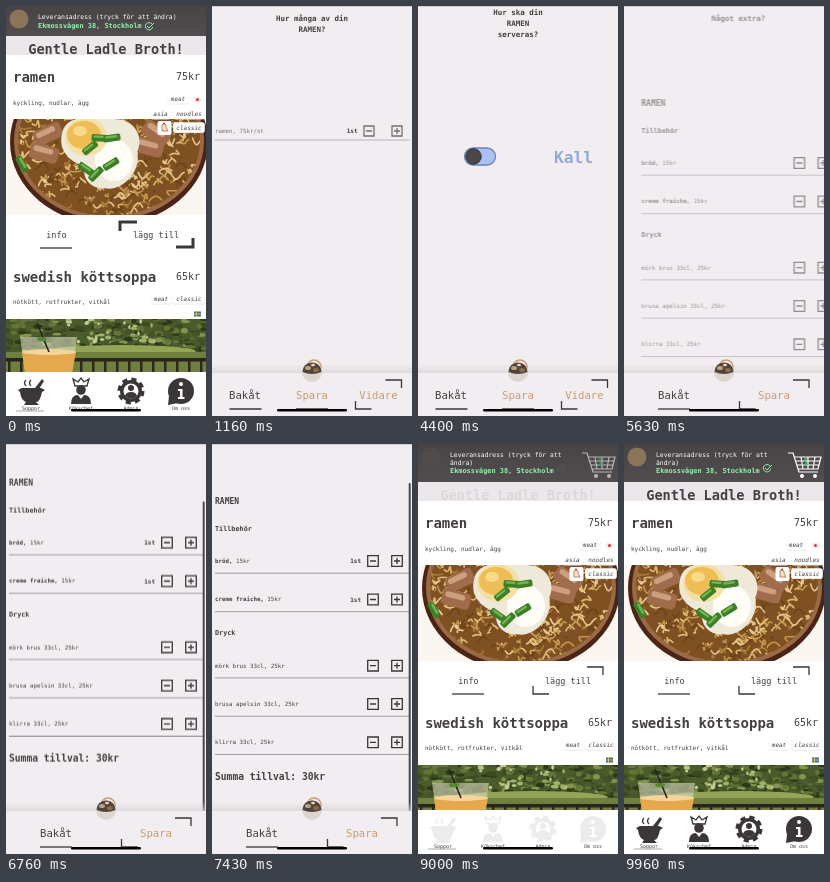
An HTML page for the animation above (10000 ms loop, 200 by 410 pixels).

```html
<!DOCTYPE html>
<html lang="sv">
<head>
<meta charset="utf-8">
<title>Soup order</title>
<style>
html, body { margin: 0; width: 100%; height: 100%; overflow: hidden; background: #f1edf0; }
svg { display: block; width: 100vw; height: 100vh; }
text { font-family: "DejaVu Sans Mono", monospace; fill: #443f42; white-space: pre; }
.b { font-weight: bold; }
.i { font-style: oblique; }
.mid { text-anchor: middle; }
.end { text-anchor: end; }
.light { fill: #fff; }
.mint { fill: #91f2ab; }
.green { fill: #3fcb62; }
.gold { fill: #c99d6b; }
.cold { fill: #93a9d9; }
.warm { fill: #d98d78; }
.line { fill: none; stroke: #3b3638; stroke-width: 1.3; }
.rule { stroke: #989297; stroke-width: .9; }
</style>
</head>
<body>
<svg id="stage" viewBox="0 0 200 410" xmlns="http://www.w3.org/2000/svg"></svg>
<script>
const LOOP = 10000;
let css = '', count = 0;

// Each stop is [milliseconds, declarations].
function anim(...stops) {
  const name = 'k' + count++;
  css += `@keyframes ${name}{${stops.map(([ms, d]) => `${ms / LOOP * 100}%{${d}}`).join('')}}`;
  return `style="animation:${name} ${LOOP}ms linear infinite"`;
}
const fade = (...stops) => anim(...stops.map(([ms, o]) => [ms, `opacity:${o}`]));
const group = (motion, ...parts) => `<g ${motion}>${parts.join('')}</g>`;

// Visible only between two times, with hard edges.
function hold(from, to, ...parts) {
  const stops = from ? [[0, 0], [from - 1, 0], [from, 1]] : [[0, 1]];
  stops.push(...(to < LOOP ? [[to - 1, 1], [to, 0], [LOOP, 0]] : [[LOOP, 1]]));
  return group(fade(...stops), ...parts);
}
// Flies in from the right and fades away.
function page([in0, in1, out0, out1], ...parts) {
  const away = 'opacity:0;transform:translateX(30px)';
  const home = 'opacity:1;transform:none';
  return group(anim([0, away], [in0, away + ';animation-timing-function:ease-out'], [in1, home], [out0, home],
    [out1, away], [LOOP, away]), ...parts);
}

const text = (x, cy, size, str, cls = '') =>
  `<text x="${x}" y="${cy + size * .34}" font-size="${size}" class="${cls}">${str}</text>`;
const rect = (x, y, w, h, fill, r = 0) =>
  `<rect x="${x}" y="${y}" width="${w}" height="${h}" rx="${r}" fill="${fill}"/>`;
const oval = (x, y, rx, ry, fill) => `<ellipse cx="${x}" cy="${y}" rx="${rx}" ry="${ry}" fill="${fill}"/>`;
const dot = (x, y, r, fill) => oval(x, y, r, r, fill);
const path = (d, extra = 'class="line"') => `<path d="${d}" ${extra}/>`;
const rule = (y, x1 = 3, x2 = 198) => path(`M${x1} ${y}H${x2}`, 'class="rule"');
const range = n => [...Array(n).keys()];

let seed = 7;
const rand = (lo, hi) => {
  seed = seed * 16807 % 2147483647;
  return lo + (hi - lo) * seed / 2147483647;
};
const pick = list => list[Math.floor(rand(0, list.length))];

const corners = (x1, y1, x2, y2) =>
  path(`M${x2 - 16} ${y1}H${x2}V${y1 + 8}M${x1} ${y2 - 8}V${y2}H${x1 + 16}`);
const pressedCorners = (x1, y1, x2, y2) =>
  path(`M${x1} ${y1 + 9}V${y1}H${x1 + 17}M${x2} ${y2 - 9}V${y2}H${x2 - 17}`, 'class="line" style="stroke-width:3"');

const button = (x, y, size, plus) =>
  path(`M${x - size} ${y - size}h${2 * size}v${2 * size}h${-2 * size}zM${x - 3} ${y}h6${plus ? `M${x} ${y - 3}v6` : ''}`);

function row(y, label, line, minus = 157, size = 5) {
  return text(3, y, 5.8, label) + button(minus, y, size) + button(185, y, size, true) + rule(y + line);
}

function ramenPhoto() {
  const noodles = range(300).map(() => {
    const x = rand(8, 194), y = rand(110, 212), w = rand(-10, 10), h = rand(-6, 6);
    const tone = pick(['#c4984f', '#ddb973', '#a97836', '#6d4318', '#e5c78c']);
    return path(`M${x} ${y}q${w / 2} ${h * 2} ${w} ${h}t${h} ${-w / 2}`, `fill="none" stroke="${tone}" stroke-width="1.6"`);
  }).join('');
  const slab = (w, h, dark, pale) => ([x, y, a]) => `<g transform="translate(${x} ${y}) rotate(${a})">` +
    rect(-w / 2, -h / 2, w, h, dark, h / 4) + rect(-w * .4, -h * .35, w * .7, h * .35, pale, h / 6) + '</g>';
  const leaf = slab(17, 7, '#3c7f28', '#74b350');
  const meat = slab(29, 16, '#a06c4c', '#cb9f80');
  return `<g clip-path="url(#photo)">${rect(0, 113, 200, 96, '#fbf6f0')}
    ${oval(103, 136, 99, 83, '#4a2415')}${oval(103, 135, 95, 79, '#9a6a45')}${oval(103, 135, 91, 75, '#7f5022')}
    <g clip-path="url(#bowl)">${noodles}</g>
    ${[[42, 128, -25], [38, 147, 15], [150, 127, 35], [143, 141, 15]].map(meat).join('')}
    ${path('M56 128C59 107 91 110 108 113C130 113 138 132 131 146C136 165 116 187 98 182C84 184 74 169 80 160C63 157 52 143 56 128Z', 'fill="#efe9da"')}
    ${oval(108, 154, 19, 21, '#fffdf6')}${oval(80, 131, 21, 19, '#f5dfa4')}${oval(78, 129, 17, 14, '#eebd55')}${oval(74, 125, 7, 5, '#f8da88')}
    ${[[94, 132, 4], [106, 132, -8], [84, 142, -38], [105, 158, -32], [80, 163, 35], [90, 168, -45], [16, 158, 60]].map(leaf).join('')}</g>`;
}

function gardenPhoto() {
  const foliage = range(260).map(() => {
    const y = rand(310, 345);
    return oval(rand(0, 200), y, rand(2, 5), rand(1, 3), pick(['#2c3919', '#44542a', '#647537', '#85934f', '#3a4a20']));
  }).join('');
  const sunlight = range(30).map(() =>
    oval(rand(60, 150), rand(313, 336), rand(1, 4), rand(1, 2.5), pick(['#c3ca94', '#a5b36a']))).join('');
  return `<g clip-path="url(#garden)">${rect(0, 313, 200, 60, '#4b5c2c')}${foliage}${sunlight}
    ${oval(115, 345, 75, 6, '#95a557')}${rect(0, 346, 200, 24, '#6f803e')}
    ${rect(0, 352, 200, 3.5, '#29231c')}${range(17).map(i => rect(i * 12 + 2, 355, 2.5, 18, '#2f281f')).join('')}
    ${path('M14 331H71L65 373H20Z', 'fill="#d9d9bd" opacity=".6"')}
    ${path('M16 346H70L65 373H20Z', 'fill="#e5a84c"')}${oval(43, 346, 27, 3, '#f3d59b')}
    ${path('M43 346L31 317', 'stroke="#222" stroke-width="1.6"')}${oval(36, 333, 5, 2, '#57852c')}</g>`;
}

function tag(x, y, str) {
  const w = str.length * 3.6 + 6;
  return rect(x - w / 2, y - 5, w, 10.5, '#e6e2e4', 2) + rect(x - w / 2, y - 5, w, 9.8, '#fff', 2) +
    text(x, y, 6, str, 'i mid');
}

const icons = [
  path('M12 384L16 382H35L39 384L36 386Q34 396 30 396L33 399H18L20 396Q15 394 14 386Z M29 382L36 373L38 375L33 383Z', 'fill="#3b3638"') +
    path('M20 380q-3-3 0-6M25 380q-3-3 0-6'),
  path('M69 380L67 373L72 376L75 372L78 376L83 373L81 380Z') + dot(75, 384, 4.8, '#3b3638') +
    path('M65 398Q65 389 72 389L75 393L78 389Q85 389 85 398Z', 'fill="#3b3638"'),
  `<circle cx="125" cy="385" r="11.5" fill="none" stroke="#3b3638" stroke-width="4" stroke-dasharray="5 4.03"/>` +
    dot(125, 385, 11, '#3b3638') + dot(125, 385, 7.5, '#fff') + dot(125, 382, 3, '#3b3638') +
    path('M119 390Q120 386 125 386Q130 386 131 390Q125 395 119 390Z', 'fill="#3b3638"'),
  dot(175, 385, 13, '#3b3638') + path('M163 390L162 399L172 397Z', 'fill="#3b3638"') +
    dot(175, 378, 2, '#fff') + path('M172 383H176.5V391H178.5V393H172V391H174V385H172Z', 'fill="#fff"')
].join('');

const loaded = (...parts) =>
  group(fade([0, 1], [600, 1], [601, 0], [8960, 0], [9400, 1], [LOOP, 1]), ...parts);

const check = (x, y) => path(`M${x + 3} ${y - 2}A3.7 3.7 0 1 0 ${x + 3.7} ${y + 1}M${x - 2} ${y}l2 2l5-5`,
  'fill="none" stroke="#91f2ab" stroke-width="1"');

const menu = [
  rect(0, 49, 200, 262, '#fff'),
  rect(0, 28, 200, 21, '#ece7ea'),
  loaded(text(100, 43, 13.6, 'Gentle Ladle Broth!', 'b mid')),
  text(7, 71, 14, 'ramen', 'b'), text(194, 71, 10, '75kr', 'end'),
  text(7, 96.5, 6, 'kyckling, nudlar, ägg'),
  ramenPhoto(),
  tag(172, 93, 'meat'), rect(188, 91, 7, 5, '#eee'), dot(191.5, 93.5, 1.5, '#d33'),
  tag(154.5, 108, 'asia'), tag(183, 108, 'noodles'), tag(183, 121.5, 'classic'),
  rect(151.5, 115, 14, 14, '#fff', 2),
  path('M156 125V119q2-3 4 0v2l2 4z', 'fill="#f4e4cf" stroke="#b87845" stroke-width=".9"'), dot(158, 117.5, 1, '#c33'),
  text(50.5, 229, 8.5, 'info', 'mid'), path('M34 242H66'),
  text(150, 229, 8.5, 'lägg till', 'mid'),
  hold(0, 1000, pressedCorners(114, 216, 187, 241)),
  hold(1000, LOOP, corners(115, 215, 185, 242)),
  text(7, 271, 14, 'swedish köttsoppa', 'b'), text(194, 271, 10, '65kr', 'end'),
  text(7, 296, 6, 'nötkött, rotfrukter, vitkål'),
  tag(155, 293, 'meat'), tag(183, 293, 'classic'),
  gardenPhoto(),
  rect(185, 302, 13, 11, '#fff', 2),
  rect(188, 305.5, 7, 5, '#3d6c96'), path('M188 308h7M190.5 305.5v5', 'stroke="#d9c25c"')
];

const header = [
  hold(0, 1000, rect(0, 0, 200, 30, 'url(#bar)'), text(32, 11, 6.4, 'Leveransadress (tryck för att ändra)', 'light'),
    text(32, 19.5, 6.9, 'Ekmossvägen 38, Stockholm', 'b mint'), loaded(check(143, 20))),
  hold(1000, LOOP, rect(0, 0, 200, 38, 'url(#bar)'), text(32, 11, 6.4, 'Leveransadress (tryck för att', 'light'),
    text(32, 19, 6.4, 'ändra)', 'light'), text(32, 27, 6.9, 'Ekmossvägen 38, Stockholm', 'b mint'), loaded(check(143, 24))),
  loaded(dot(13, 13, 9.5, '#8b7558'))
];

const nav = [
  rect(0, 366, 200, 44, '#fff'), loaded(icons), path('M10 405H38', 'stroke="#aaa"'),
  ...['Soppor', 'Kökschef', 'Admin', 'Om oss'].map((label, i) => text(25 + 50 * i, 402, 5, label, 'mid'))
];

const home = group(fade([0, 1], [30, 1], [360, 0], [8050, 0], [8400, 1], [LOOP, 1]),
  rect(0, 0, 200, 410, '#fff'),
  group(anim([0, 'transform:none'], [999, 'transform:none'], [1000, 'transform:translateY(8px)'], [LOOP, 'transform:translateY(8px)']), ...menu),
  ...header,
  group(fade([0, 0], [8200, 0], [8350, 1], [8700, 1], [8960, 0], [LOOP, 0]), rect(197, 2, 2, 132, '#858084', 1)),
  ...nav);

const title = (...lines) => lines.map((l, i) =>
  text(100, (lines.length > 2 ? 6 : 12) + 11 * i, 7.5, l, 'b mid')).join('');

const amountPage = page([330, 660, 1730, 1900],
  title('Hur många av din', 'RAMEN?'),
  group(fade([0, .55], [1130, .55], [1230, 1], [LOOP, 1]), row(125, 'ramen, 75kr/st', 9)),
  hold(1160, LOOP, text(145.5, 125, 6, '1st', 'b end')));

const extrasPage = page([1880, 2160, 3200, 3600],
  title('Något extra på din', 'RAMEN?'),
  row(107, 'avocado, 15 kr/st', 12.5), row(131.7, 'sesamfrön, 5 kr/st', 12.4), row(156.2, 'kokosflarn, 10 kr/st', 12.3),
  hold(0, 2430, text(3, 185, 9.65, 'Summa extra: 0kr', 'b')),
  hold(2430, LOOP, text(3, 185, 9.65, 'Summa extra: 5kr', 'b'), text(145.5, 131.7, 6, '1st', 'b end')));

const track = (fill, stroke) => `<rect x="46.5" y="142" width="31" height="17" rx="8.5" fill="${fill}" stroke="${stroke}" stroke-width="1.3"/>`;
const servePage = page([3550, 4200, 5260, 5500],
  title('Hur ska din', 'RAMEN', 'serveras?'),
  track('#a8c2f6', '#6f82ac'),
  group(fade([0, 0], [4450, 0], [4800, 1], [LOOP, 1]), track('#f2b5a2', '#b77967')),
  group(anim([0, 'transform:none'], [4450, 'transform:none'], [4800, 'transform:translateX(13px)'], [LOOP, 'transform:translateX(13px)']),
    '<circle cx="55.5" cy="150.5" r="7.7" fill="#4b4748" stroke="#302c2e"/>'),
  group(anim([0, 'opacity:1;transform:none'], [4450, 'opacity:1;transform:none'],
    [4850, 'opacity:0;transform:translateX(50px)'], [LOOP, 'opacity:0']), text(136, 151, 16.2, 'Kall', 'b cold')),
  group(anim([0, 'opacity:0;transform:translateX(50px)'], [4850, 'opacity:0;transform:translateX(50px)'],
    [5230, 'opacity:1;transform:none'], [LOOP, 'opacity:1']), text(136, 151, 16.2, 'Varm', 'b warm')));

const bold = s => `<tspan class="b">${s}</tspan>`;
const sideRows = [
  [117, bold('bröd,') + ' 15kr', 6100], [155.5, bold('creme fraiche,') + ' 15kr', 6400],
  [221.7, 'mörk brus 33cl, 25kr'], [260, 'brusa apelsin 33cl, 25kr', 7500], [298.3, 'klirra 33cl, 25kr', 7730]
];
const sums = [[0, 0], [6100, 15], [6400, 30], [7500, 55], [7730, 80], [LOOP]];
const sidesPage = page([5480, 5900, 7960, 8150],
  group(anim([0, 'transform:translateY(40px)'], [6660, 'transform:translateY(40px)'],
    [6760, 'transform:translateY(-18.5px);animation-timing-function:ease-out'], [7160, 'transform:none'], [LOOP, 'transform:none']),
    text(100, -28, 7.5, 'Något extra?', 'b mid'),
    text(3, 57.5, 8, 'RAMEN', 'b'), text(3, 84.3, 6.8, 'Tillbehör', 'b'), text(3, 188.6, 6.8, 'Dryck', 'b'),
    ...sideRows.map(([y, label, at]) => row(y, label, 12.2, 161, 5.3) +
      (at ? hold(at, LOOP, text(149, y, 6, '1st', 'b end')) : '')),
    ...sums.slice(0, -1).map(([at, sum], i) => hold(at, sums[i + 1][0], text(3, 333, 9.65, `Summa tillval: ${sum}kr`, 'b')))),
  group(anim([0, 'opacity:0'], [6660, 'opacity:0;transform:none'], [6760, 'opacity:1;transform:translateY(18.5px)'],
    [7160, 'opacity:1;transform:none'], [7440, 'opacity:1;transform:none'], [7560, 'opacity:0'], [LOOP, 'opacity:0']),
    rect(196.7, 39, 2, 330, '#4b4749', 1)));

const footerBase = rect(0, 358, 200, 9, 'url(#shade)') + rect(0, 367, 200, 43, '#f1edf0');
const label = (x, str, cls = '') => text(x, 389, 10.6, str, 'mid ' + cls);
const footers = [
  group(fade([0, 0], [330, 0], [500, 1], [5400, 1], [5600, 0], [LOOP, 0]), footerBase,
    label(33, 'Bakåt'), label(100, 'Spara', 'gold'), label(166.5, 'Vidare', 'gold'),
    path('M17.5 403H49.5M84 403H116'), corners(143.5, 374, 189.5, 403)),
  group(fade([0, 0], [5400, 0], [5600, 1], [7960, 1], [8150, 0], [LOOP, 0]), footerBase,
    label(50, 'Bakåt'), label(150, 'Spara', 'gold'), path('M34 403H66'), corners(115.5, 374, 185, 403))
];

const cart = group(fade([0, 0], [8700, 0], [9200, 1], [LOOP, 1]),
  path('M164 9H169L175 28H194M170 13H197L194 25H174M171 17H196M173 21H195M177 13L179 25M184 13V25M191 13L189 25',
    'fill="none" stroke="#fff" stroke-width="1.2"') +
  dot(178, 32, 2, '#fff') + dot(191, 32, 2, '#fff') + text(182, 18, 9, '1', 'b mid green'));
const glow = group(fade([0, 0], [8100, 0], [8460, 1], [8960, 0], [LOOP, 0]), dot(184, 21, 15, 'url(#ball)'));

const bowl = '<circle cx="102" cy="361" r="7" fill="none" stroke="#c99d6b" stroke-width="1.5"/>' +
  dot(100, 366, 10, '#ddd6cf') + path('M90.5 366Q91 357 100 356.5Q109 357 109.5 366Q100 370 90.5 366Z', 'fill="#51443b"') +
  oval(96, 362, 3, 2, '#bda184') + oval(104, 364, 3, 2, '#8b6b4c') + oval(101, 359, 2, 1.3, '#e7d7bb');

// The bowl rises evenly while its sideways drift accelerates.
const flight = range(11).map(i => {
  const p = i / 10;
  return [7960 + 1000 * p, `opacity:${Math.min(1, 5 - 5 * p)};transform:translate(${82 * p ** 2.25}px,${-347 * p}px)`];
});
const flyingBowl = group(anim([0, 'opacity:0;transform:none'], [330, 'opacity:0;transform:none'], [500, 'opacity:1;transform:none'],
  ...flight, [LOOP, flight[10][1]]), bowl);

const defs = `<defs>
  <clipPath id="photo"><rect y="113" width="200" height="96"/></clipPath>
  <clipPath id="garden"><rect y="313" width="200" height="60"/></clipPath>
  <clipPath id="bowl"><ellipse cx="103" cy="135" rx="91" ry="75"/></clipPath>
  <linearGradient id="bar" x2="0" y2="1"><stop stop-color="#484446"/><stop offset="1" stop-color="#514c4e"/></linearGradient>
  <linearGradient id="shade" x2="0" y2="1"><stop stop-color="#d8d2d5" stop-opacity="0"/><stop offset="1" stop-color="#d8d2d5" stop-opacity=".7"/></linearGradient>
  <linearGradient id="ball" x2="1" y2="1"><stop stop-color="#454143"/><stop offset="1" stop-color="#686366"/></linearGradient>
</defs>`;

const scene = [defs, rect(0, 0, 200, 410, '#f1edf0'), rect(0, 0, 200, 1, '#d3ced1'),
  amountPage, extrasPage, servePage, sidesPage, ...footers, home, glow, cart, flyingBowl,
  rect(65, 403, 70, 2.6, '#000', 1.3)].join('');
document.head.insertAdjacentHTML('beforeend', `<style>${css}</style>`);
document.getElementById('stage').innerHTML = scene;
</script>
</body>
</html>
```
